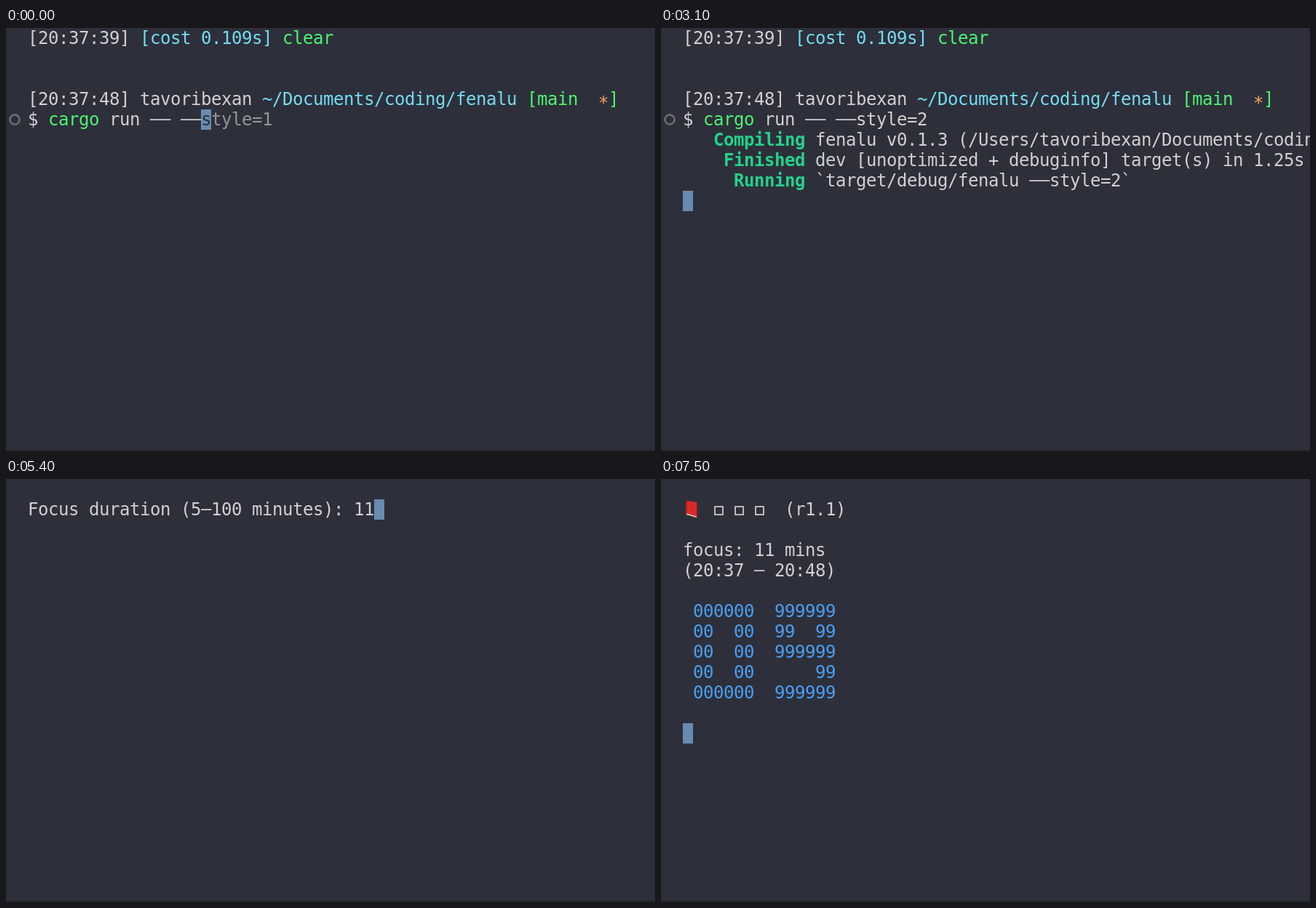
Recreate the animation shown at these times as an HTML page with a canvas. Size 892 by 582 pixels, loop 8 s.

```html
<!DOCTYPE html>
<html lang="en">
<head>
<meta charset="utf-8">
<title>Terminal timer</title>
<style>
html, body { margin: 0; width: 100%; height: 100%; overflow: hidden; background: #2d303a; }
canvas { display: block; width: 892px; height: 582px; }
</style>
</head>
<body>
<canvas id="stage" width="892" height="582"></canvas>
<script>
const ctx = document.getElementById('stage').getContext('2d');
const LOOP = 8000, LEFT = 30, CELL = 14, ROW = 28, BASE = 22;
const FONT = '24px "DejaVu Sans Mono", "Liberation Mono", monospace';
const COLOR = {
  bg: '#2d303a', text: '#d0d0d0', ghost: '#92949a', cyan: '#75dcf3', green: '#4df472',
  orange: '#f0a55c', done: '#24d18b', build: '#29b8db', blue: '#4c9df2', cursor: '#6a8bb0'
};
const USER = 'tavoribexan', APP = 'fenalu', DIR = 'coding';

// Wide, vertically centred forms of these two signs: [glyph, y shift]
const SIGNS = { '-': ['\u2013', -1.5], '*': ['*', 4.5] };

function put(row, col, str, color = COLOR.text, bold = false) {
  ctx.font = (bold ? 'bold ' : '') + FONT;
  ctx.fillStyle = color;
  [...str].forEach((ch, i) => {
    if (ch === ' ') return;
    const [glyph, dy] = SIGNS[ch] || [ch, 0];
    ctx.fillText(glyph, LEFT + (col + i) * CELL, row * ROW + BASE + dy);
  });
}

function cursor(row, col, under = '') {
  ctx.fillStyle = COLOR.cursor;
  ctx.fillRect(LEFT + col * CELL, row * ROW, CELL, ROW);
  put(row, col, under, COLOR.bg);
}

// Last value whose start time has passed
function at(t, steps) {
  let value = steps[0][1];
  for (const [start, v] of steps) if (t >= start) value = v;
  return value;
}

function shell(t) {
  put(0, 0, '[20:37:39]');
  put(0, 11, '[cost 0.109s]', COLOR.cyan);
  put(0, 25, 'clear', COLOR.green);

  put(3, 0, '[20:37:48] ' + USER);
  put(3, 23, `~/Documents/${DIR}/${APP}`, COLOR.cyan);
  put(3, 49, '[main', COLOR.green);
  put(3, 56, '*', COLOR.orange);
  put(3, 57, ']', COLOR.green);

  ctx.strokeStyle = '#6b6d74';
  ctx.lineWidth = 2.6;
  ctx.beginPath();
  ctx.arc(12, 126, 6.6, 0, Math.PI * 2);
  ctx.stroke();

  const typed = at(t, [[0, 0], [200, 1], [300, 3], [500, 4], [600, 5], [700, 6], [900, 7]]);
  put(4, 0, '$');
  put(4, 2, 'cargo', COLOR.green);
  put(4, 8, 'run -- --' + 'style=2'.slice(0, typed));
  const rest = 'style=1'.slice(typed);
  put(4, 18 + typed, rest.slice(1), COLOR.ghost);
  if (t < 1500) return cursor(4, 17 + typed, rest.slice(0, 1));
  if (t < 1800) return cursor(5, 0);

  put(5, 3, 'Compiling', COLOR.done, true);
  put(5, 13, `${APP} v0.1.3 (/Users/${USER}/Documents/${DIR}`);
  if (t < 2900) {
    put(6, 4, 'Building', COLOR.build, true);
    put(6, 13, `[${'='.repeat(25)}> ] 82/83: ${APP}(bin)`);
    return cursor(6, 0);
  }
  put(6, 4, 'Finished', COLOR.done, true);
  put(6, 13, 'dev [unoptimized + debuginfo] target(s) in 1.25s');
  put(7, 5, 'Running', COLOR.done, true);
  put(7, 13, `\`target/debug/${APP} --style=2\``);
  cursor(8, 0);
}

function questions(t) {
  const answers = [
    ['Focus', 3200, [[0, ''], [3800, '1'], [4600, '10'], [4900, '1'], [5000, ''], [5200, '1'], [5400, '11']]],
    ['Short break', 5500, [[0, ''], [5800, '5']]],
    ['Long break', 5900, [[0, ''], [6000, '5']]]
  ].filter(([, start]) => t >= start);
  answers.forEach(([name, , steps], i) => {
    const line = `${name} duration (5-100 minutes): ${at(t, steps)}`;
    put(i + 1, 0, line);
    if (i === answers.length - 1) cursor(i + 1, line.length);
  });
}

function poly(color, ...points) {
  ctx.fillStyle = color;
  ctx.beginPath();
  points.forEach(([x, y]) => ctx.lineTo(x, y));
  ctx.fill();
}

function book() {
  poly('#7d1b1d', [34, 31], [37, 30], [50, 32], [51, 52], [49, 54], [34, 49]);
  poly('#d8d3cc', [35, 47], [49, 51], [49, 53], [35, 49]);
  poly('#d92b2b', [36, 30], [49, 32], [49, 51.5], [36, 47.5]);
  poly('#b12123', [34, 31], [36, 30], [36, 47.5], [34, 48]);
}

// Block digits built from their own numeral: F full, E both ends, R right end
const SHAPES = { 0: 'FEEEF', 1: 'LMMMF', 9: 'FEFRF' };
const STROKES = { F: '######', E: '##  ##', R: '    ##', L: '####', M: '  ##' };

function bigNumber(num) {
  [...num].forEach((d, i) => {
    [...SHAPES[d]].forEach((s, r) =>
      put(6 + r, 1 + i * 8, STROKES[s].replace(/#/g, d), COLOR.blue));
  });
}

function timer(t) {
  book();
  ctx.strokeStyle = COLOR.text;
  ctx.lineWidth = 1.7;
  for (const col of [3, 5, 7]) ctx.strokeRect(LEFT + col * CELL + 2, 38, 11, 11);
  put(1, 10, '(r1.1)');
  put(3, 0, 'focus: 11 mins');
  put(4, 0, '(20:37 - 20:48)');
  if (t < 6500) return cursor(4, 15);
  bigNumber(t < 7500 ? '10' : '09');
  cursor(12, 0);
}

function draw(t) {
  ctx.fillStyle = COLOR.bg;
  ctx.fillRect(0, 0, 892, 582);
  ctx.fillStyle = '#272932';
  ctx.fillRect(0, 580, 892, 2);
  if (t < 3200) shell(t);
  else if (t < 6100) questions(t);
  else timer(t);
}

const begin = performance.now();
function tick() {
  draw((performance.now() - begin) % LOOP);
  requestAnimationFrame(tick);
}
tick();
</script>
</body>
</html>
```
